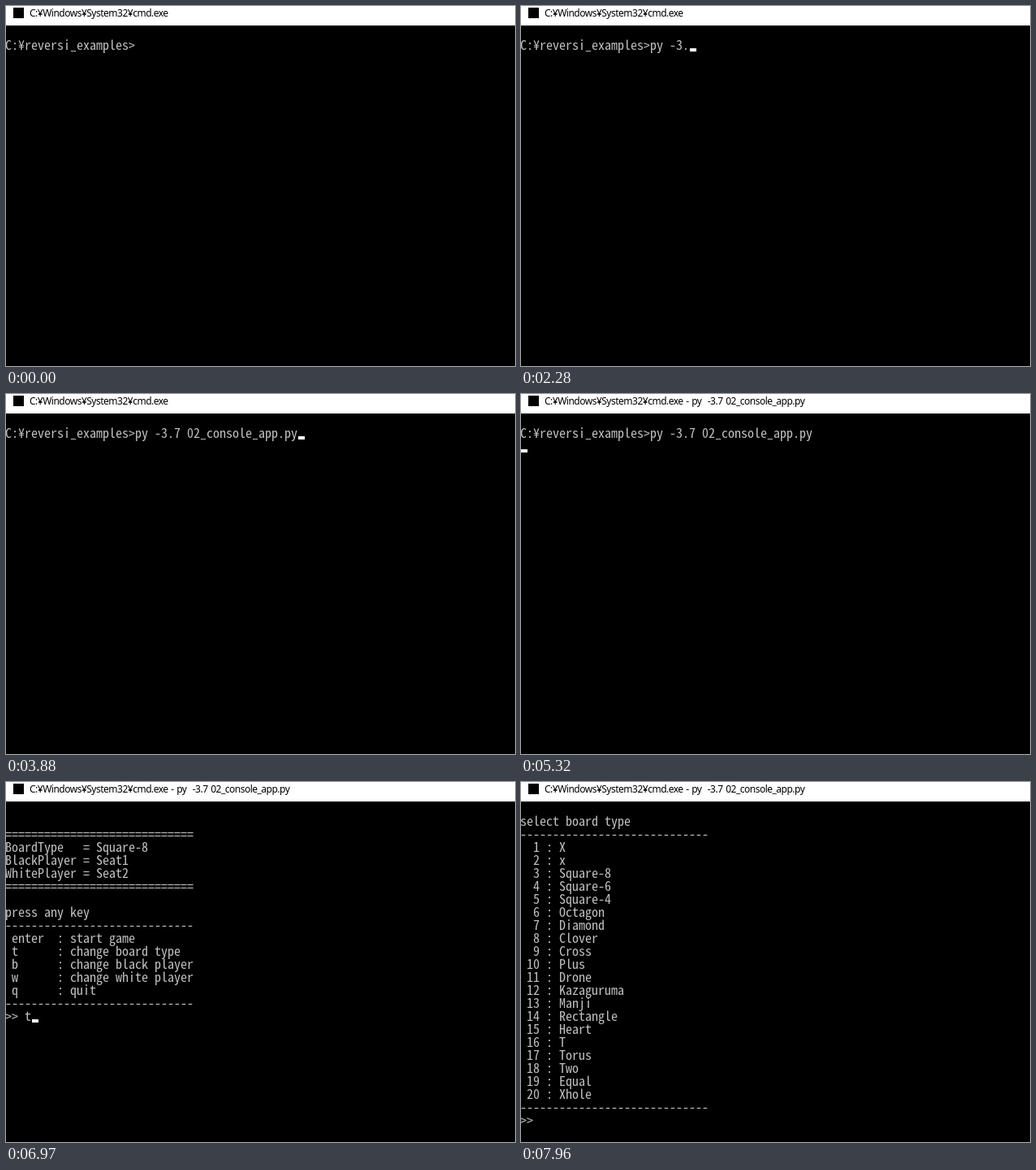
Animation, 627 px wide and 443 px high, one loop 8 s. Source, as an HTML page:

```html
<!DOCTYPE html>
<html lang="en">
<head>
<meta charset="utf-8">
<title>Console</title>
<style>
  html, body { margin: 0; width: 100%; height: 100%; overflow: hidden; background: #000; }
  #stage { position: relative; width: 627px; height: 443px; overflow: hidden; background: #000; }
  #bar { position: absolute; inset: 0 0 auto; height: 24px; background: #fff; }
  #icon { position: absolute; left: 9px; top: 2px; width: 13px; height: 13px; background: #000; }
  #title {
    position: absolute; left: 29px; top: 0; white-space: pre; color: #000;
    font: 12px/18px "Noto Sans", "Open Sans", sans-serif;
    letter-spacing: -0.5px; word-spacing: 1px;
  }
  #screen {
    position: absolute; left: -1px; top: 23px; margin: 0; color: #c0c0c0; white-space: pre;
    font: 300 16px/16px "Noto Sans Mono CJK JP", "Noto Sans CJK JP", monospace;
    font-feature-settings: "liga" 0, "calt" 0;
  }
  #cursor { position: absolute; width: 8px; height: 4px; background: #fff; }
</style>
</head>
<body>
<div id="stage">
  <div id="bar"><div id="icon"></div><div id="title"></div></div>
  <pre id="screen"></pre>
  <div id="cursor"></div>
</div>
<script>
const LOOP = 8000, CELL = 8, ROW = 16, TOP = 24;
const $ = id => document.getElementById(id);
const command = "py -3.7 02_console_app.py";
const shell = "C:¥Windows¥System32¥cmd.exe";
const running = shell + " - py  -3.7 02_console_app.py";
const rule = mark => mark.repeat(29);

const prompt = count => "\nC:¥reversi_examples>" + command.slice(0, count);
const launched = prompt(command.length) + "\n";

const menu = `

${rule("=")}
BoardType   = Square-8
BlackPlayer = Seat1
WhitePlayer = Seat2
${rule("=")}

press any key
${rule("-")}
 enter  : start game
 t      : change board type
 b      : change black player
 w      : change white player
 q      : quit
${rule("-")}
>> `;

const boards = ("X x Square-8 Square-6 Square-4 Octagon Diamond Clover Cross Plus Drone " +
  "Kazaguruma Manji Rectangle Heart T Torus Two Equal Xhole").split(" ");
const list = [
  "", "select board type", rule("-"),
  ...boards.map((name, i) => ` ${String(i + 1).padStart(2)} : ${name}`),
  rule("-"), ">> "
].join("\n");

// start time, screen text, cursor visible
const steps = [
  [0, prompt(0), 0], [120, prompt(0), 1], [620, prompt(0), 0],
  [930, prompt(1), 1], [1180, prompt(1), 0],
  [1240, prompt(2), 1], [1490, prompt(3), 1], [1670, prompt(3), 0],
  [1790, prompt(4), 1], [2040, prompt(5), 1], [2160, prompt(5), 0],
  [2280, prompt(6), 1], [2590, prompt(7), 1], [2710, prompt(7), 0],
  [3080, prompt(8), 1], [3200, prompt(8), 0],
  [3510, prompt(9), 1], [3630, prompt(10), 1], [3700, prompt(10), 0],
  [3880, prompt(command.length), 1],
  [4510, launched, 1], [4820, launched, 0], [5320, launched, 1],
  [5570, menu, 1], [6380, menu, 0], [6910, menu, 1], [6970, menu + "t", 1],
  [7400, list, 1], [7960, list, 0]
];

let shown;
function draw(step) {
  const [time, text, blink] = step;
  const lines = text.split("\n");
  $("title").textContent = time < 4510 ? shell : running;
  $("screen").textContent = text;
  const style = $("cursor").style;
  style.left = lines.at(-1).length * CELL + "px";
  style.top = TOP + lines.length * ROW - 4 + "px";
  style.visibility = blink ? "visible" : "hidden";
}

const start = performance.now();
function tick() {
  const t = Math.max(0, performance.now() - start) % LOOP;
  const step = steps.findLast(s => s[0] <= t);
  if (step !== shown) draw(shown = step);
  requestAnimationFrame(tick);
}
tick();
</script>
</body>
</html>
```
